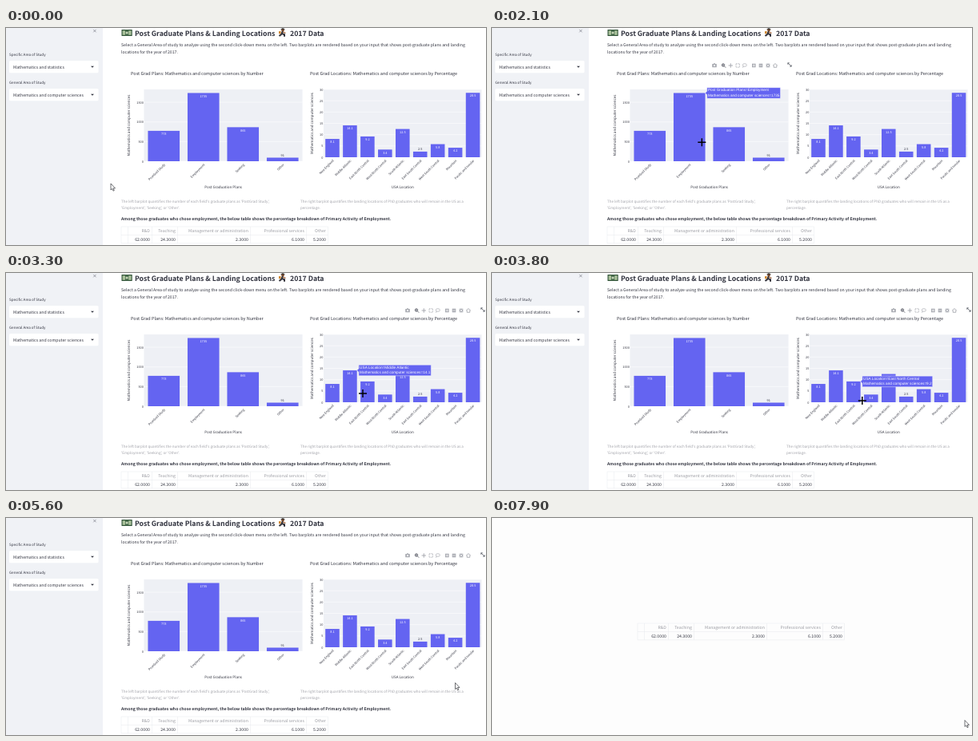
Animation, 600 px wide and 272 px high, one loop 8000 ms. Source, as an HTML page:

```html
<!DOCTYPE html>
<html lang="en">
<head>
<meta charset="utf-8">
<title>Post graduate dashboard</title>
<style>
html, body { margin: 0; height: 100%; overflow: hidden; background: #fff; }
svg { display: block; width: 100vw; height: 100vh; }
text {
  font-family: "Noto Sans CJK JP", "Noto Sans CJK SC", "Noto Sans CJK KR", "Noto Sans CJK TC", "Open Sans", sans-serif;
  text-rendering: geometricPrecision;
  white-space: pre;
}
#tip text { font: 4.71px "Liberation Sans", Arial, sans-serif; fill: #fff; }
</style>
</head>
<body>
<svg id="stage" viewBox="0 0 600 272"></svg>
<script>
const INK = '#31333f', BAR = '#6464f1', SUBJECT = 'Mathematics and computer sciences';
const UNIT = 0.3245; // CSS font pixels to stage pixels

const esc = s => String(s).replace(/&/g, '&amp;');
const rect = (x, y, w, h, fill, more = '') =>
  `<rect x="${x}" y="${y}" width="${w}" height="${h}" fill="${fill}" ${more}/>`;
const path = (d, stroke, width = 0.7, fill = 'none') =>
  `<path d="${d}" stroke="${stroke}" stroke-width="${width}" fill="${fill}"/>`;
const text = (x, y, s, size, more = '', fill = INK) =>
  `<text x="${x}" y="${y}" font-size="${size * UNIT}" fill="${fill}" ${more}>${esc(s)}</text>`;
const MID = 'text-anchor="middle"', END = 'text-anchor="end"', BOLD = 'font-weight="700"';

const charts = [
  {
    title: 'Post Grad Plans: ' + SUBJECT + ' by Number', titleX: 156,
    axis: 'Post Graduation Plans', x: 172.5, pitch: 49.5, base: 167, scale: 0.0493,
    tick: 500, ticks: 4, yTitleX: 154.8,
    names: ['PostGrad Study', 'Employment', 'Seeking', 'Other'],
    values: [773, 1735, 865, 91]
  },
  {
    title: 'Post Grad Locations: ' + SUBJECT + ' by Percentage', titleX: 380,
    axis: 'USA Location', x: 397, pitch: 21.95, base: 162, scale: 2.833,
    tick: 5, ticks: 7, yTitleX: 383.6,
    names: ['New England', 'Middle Atlantic', 'East North Central', 'West North Central', 'South Atlantic',
      'East South Central', 'West South Central', 'Mountain', 'Pacific and Insular'],
    values: [8.1, 14.1, 9.2, 3.4, 12.5, 2.5, 5.8, 4.2, 28.5]
  }
];

function chart(c) {
  const w = c.pitch * c.names.length, mid = (c.base + 77) / 2;
  let out = rect(c.x, 77, w, c.base - 77, '#eef0f5') + text(c.titleX, 59, c.title, 17);
  for (let i = 0; i < c.ticks; i++) {
    const y = c.base - i * c.tick * c.scale;
    out += path(`M${c.x} ${y}h${w}`, '#fff', 0.5) + text(c.x - 0.6, y + 1.5, i * c.tick, 12, END);
  }
  c.values.forEach((v, i) => {
    const x = c.x + c.pitch * (i + 0.5), h = v * c.scale, y = c.base - h, inside = h > 8;
    out += rect(x - c.pitch * 0.4, y, c.pitch * 0.8, h, BAR);
    out += text(x, inside ? y + 5.2 : y - 2, v, 12, MID, inside ? '#fff' : INK);
    out += text(0, 1.5, c.names[i], 12, END + ` transform="translate(${x + 1} ${c.base + 3.6}) rotate(-45)"`);
  });
  return out + text(c.x + w / 2, 201, c.axis, 14, MID) +
    text(0, 0, SUBJECT, 14, MID + ` transform="translate(${c.yTitleX} ${mid}) rotate(-90)"`);
}

function picker(y, label, value) {
  return text(4, y, label, 14) + rect(4, y + 6.3, 111.5, 15.2, '#fff', 'rx="1.5"') +
    text(9, y + 15.8, value, 16) + path(`M106 ${y + 13}h4l-2 2.1z`, 'none', 0, INK);
}

function table(x, y) {
  const lines = [0, 8.5, 38.5, 70.5, 161.5, 231.5, 258.5];
  const heads = ['R&D', 'Teaching', 'Management or administration', 'Professional services', 'Other'];
  const cells = ['62.0000', '24.3000', '2.3000', '6.1000', '5.2000'];
  let d = lines.map(l => `M${l} 0v20.8`).join('') + [0, 10.5, 20.8].map(l => `M0 ${l}h258.5`).join('');
  let out = path(d, '#e6e8ec', 0.5);
  heads.forEach((h, i) => {
    const right = lines[i + 2] - 2.6;
    out += text(right, 7.4, h, 16, END, '#9a9ba2') + text(right, 17.8, cells[i], 16, END);
  });
  return `<g transform="translate(${x} ${y})">${out}</g>`;
}

const expand = (x, y) => path(
  `M${x - 2.2} ${y - 0.2}v-2h2M${x - 2.2} ${y - 2.2}l4.4 4.4M${x + 2.2} ${y + 0.2}v2h-2`, '#555862', 0.8);

function toolbar(id, x) {
  const g = '#a9abb2';
  const box = (cx, mark) => rect(cx - 2.3, 44.7, 4.6, 4.6, g) + path(mark, '#fff', 0.7);
  return `<g id="${id}" transform="translate(${x} 0)">` +
    rect(-2.8, 45, 5.6, 4.2, g, 'rx=".5"') + rect(-1, 44.3, 2, 1, g) + '<circle cy="47.1" r="1.1" fill="#fff"/>' +
    '<circle cx="11" cy="46.5" r="1.7" stroke="#73757d" fill="#a9abb2"/>' + path('M12.2 47.7l2 2', '#73757d', 1) +
    path('M17.6 47h5.4M20.3 44.3v5.4', g, 1) +
    rect(27, 44.8, 4.4, 4.4, 'none', `stroke="${g}" stroke-width=".8" stroke-dasharray="1 .5"`) +
    `<ellipse cx="37.8" cy="46.5" rx="2.6" ry="1.8" fill="none" stroke="${g}" stroke-width=".7"/>` +
    path('M36.2 47.8l-.7 2', g) +
    box(49.3, 'M47.8 47h3M49.3 45.5v3') + box(58, 'M56.5 47h3') +
    box(67, 'M65.5 45.5l3 3M68.5 45.5l-3 3') +
    path('M73.2 47l2.8-2.4 2.8 2.4M74.2 46.6v2.7h3.6v-2.7', g, 0.9) +
    expand(94, 46) + '</g>';
}

// Banknote and traveller beside the heading
const note = rect(144.5, 2, 13.2, 8, '#2f5137', 'rx=".6"') + rect(145.6, 3.2, 11, 5.6, '#a9c19a') +
  rect(149, 2.4, 4.2, 7.2, '#44694a') + '<circle cx="151.1" cy="6" r="1.6" fill="#c9d6b8"/>';
const traveller = '<circle cx="346" cy="2.6" r="1.9" fill="#7a4a2c"/>' +
  path('M343 1.8q3-3 6 0z', 'none', 0, '#222') + path('M346 4l-2 4-2.5 2M345 7l3 1.2v2.6', '#33333c', 2) +
  path('M346 5l3.5 1.4', '#a8653a', 1.2) + rect(341, 4, 2.6, 3.2, '#d28b35');

const page = `<g id="page">${rect(0, 0, 600, 272, '#fff')}${rect(0, 0, 121, 272, '#f0f2f6')}` +
  path('M109.2 1.9l3.4 3.4M112.6 1.9l-3.4 3.4', '#777a84', 0.7) +
  picker(34.7, 'Specific Area of Study', 'Mathematics and statistics') +
  picker(69.7, 'General Area of Study', SUBJECT) +
  note + text(161, 9.5, 'Post Graduate Plans & Landing Locations', 27, BOLD) +
  traveller + text(355, 9.5, '2017 Data', 27, BOLD) +
  text(144, 23.2, 'Select a General Area of study to analyze using the second click-down menu on the left. ' +
    'Two barplots are rendered based on your input that shows post-graduate plans and landing', 16) +
  text(144, 32.2, 'locations for the year of 2017.', 16) +
  charts.map(chart).join('') +
  text(144, 219.2, "The left barplot quantifies the number of each field's graduate plans as 'PostGrad Study',", 14, '', '#a0a1a8') +
  text(144, 227.4, "'Employment', 'Seeking', or 'Other'.", 14, '', '#a0a1a8') +
  text(368, 219.2, 'The right barplot quantifies the landing locations of PhD graduates who will remain in the US as a', 14, '', '#a0a1a8') +
  text(368, 227.4, 'percentage.', 14, '', '#a0a1a8') +
  text(144, 241, 'Among those graduates who chose employment, the below table shows the percentage breakdown ' +
    'of Primary Activity of Employment.', 15.8, BOLD) +
  table(144, 249) + toolbar('barLeft', 278) + toolbar('barRight', 502) +
  `<g id="grow">${expand(595.8, 254.5)}</g>` +
  `<g id="tip">${path('', '#fff', 0.4, BAR)}<text x="3.4" y="-2"></text><text x="3.4" y="4.2"></text></g></g>`;

const stage = document.getElementById('stage');
stage.innerHTML = page +
  `<g id="full">${rect(0, 0, 600, 272, '#fdfdfd')}${table(182, 132)}</g>` +
  `<g id="arrow">${path('M0 0V8L1.8 6.4 3 9.2 4.3 8.6 3.1 5.9H5.5Z', '#33343a', 0.7, '#fff')}</g>` +
  `<g id="cross">${path('M-5 0H5M0-5V5', '#000', 1.5)}</g>`;

const el = id => document.getElementById(id);
const show = (id, on) => el(id).setAttribute('visibility', on ? 'visible' : 'hidden');
const within = (t, a, b) => t >= a && t < b;

// Pointer route: time, x, y
const route = [
  [0, 131, 195], [500, 162, 181], [600, 162, 181], [1100, 203, 161], [1200, 203, 160.5],
  [1500, 199, 159], [1800, 245, 140], [2000, 245, 140], [2300, 297, 150], [2700, 359.5, 170.5],
  [2900, 361, 171], [3300, 446, 151], [3500, 446, 151], [4000, 474, 166], [4400, 498, 160],
  [4600, 506.5, 155], [4800, 506.5, 155], [5200, 545, 168], [5300, 545, 168], [6000, 583.5, 258],
  [7100, 583.5, 258], [7300, 591, 253.5], [8000, 591, 253.5]
];

// Hover labels: start, end, chart, bar
const hovers = [
  [900, 1700, 0, 0], [1700, 2200, 0, 1], [2200, 2500, 0, 2], [2500, 2700, 0, 3],
  [3200, 3600, 1, 1], [3600, 4000, 1, 2], [4500, 4900, 1, 4]
];

function pointer(t) {
  const i = route.findIndex(p => p[0] > t), [t0, x0, y0] = route[i - 1], [t1, x1, y1] = route[i];
  const k = (t - t0) / (t1 - t0);
  return [x0 + (x1 - x0) * k, y0 + (y1 - y0) * k];
}

function drawTip(t) {
  const hover = hovers.find(h => within(t, h[0], h[1]));
  show('tip', hover);
  if (!hover) return;
  const c = charts[hover[2]], i = hover[3], [box, ...rows] = el('tip').children;
  rows[0].textContent = c.axis + '=' + c.names[i];
  rows[1].textContent = SUBJECT + '=' + c.values[i];
  const w = Math.max(...rows.map(r => r.getComputedTextLength())) + 2.2;
  box.setAttribute('d', `M0 0l2.2-2.2v-4.6h${w}v13.6h${-w}v-4.6z`);
  el('tip').setAttribute('transform',
    `translate(${c.x + c.pitch * (i + 0.9)} ${c.base - c.values[i] * c.scale})`);
}

function frame(now) {
  const t = Math.floor(now % 8000 / 100) * 100;
  const full = t >= 7800;
  const cross = within(t, 800, 3000) || within(t, 3200, 5500);
  const at = `translate(${pointer(t).join(' ')})`;
  for (const id of ['arrow', 'cross']) el(id).setAttribute('transform', at);
  show('arrow', !cross);
  show('cross', cross);
  show('barLeft', within(t, 300, 3000));
  show('barRight', within(t, 3000, 5700));
  show('grow', within(t, 6000, 7800));
  show('full', full);
  drawTip(t);
  requestAnimationFrame(frame);
}
requestAnimationFrame(frame);
</script>
</body>
</html>
```
